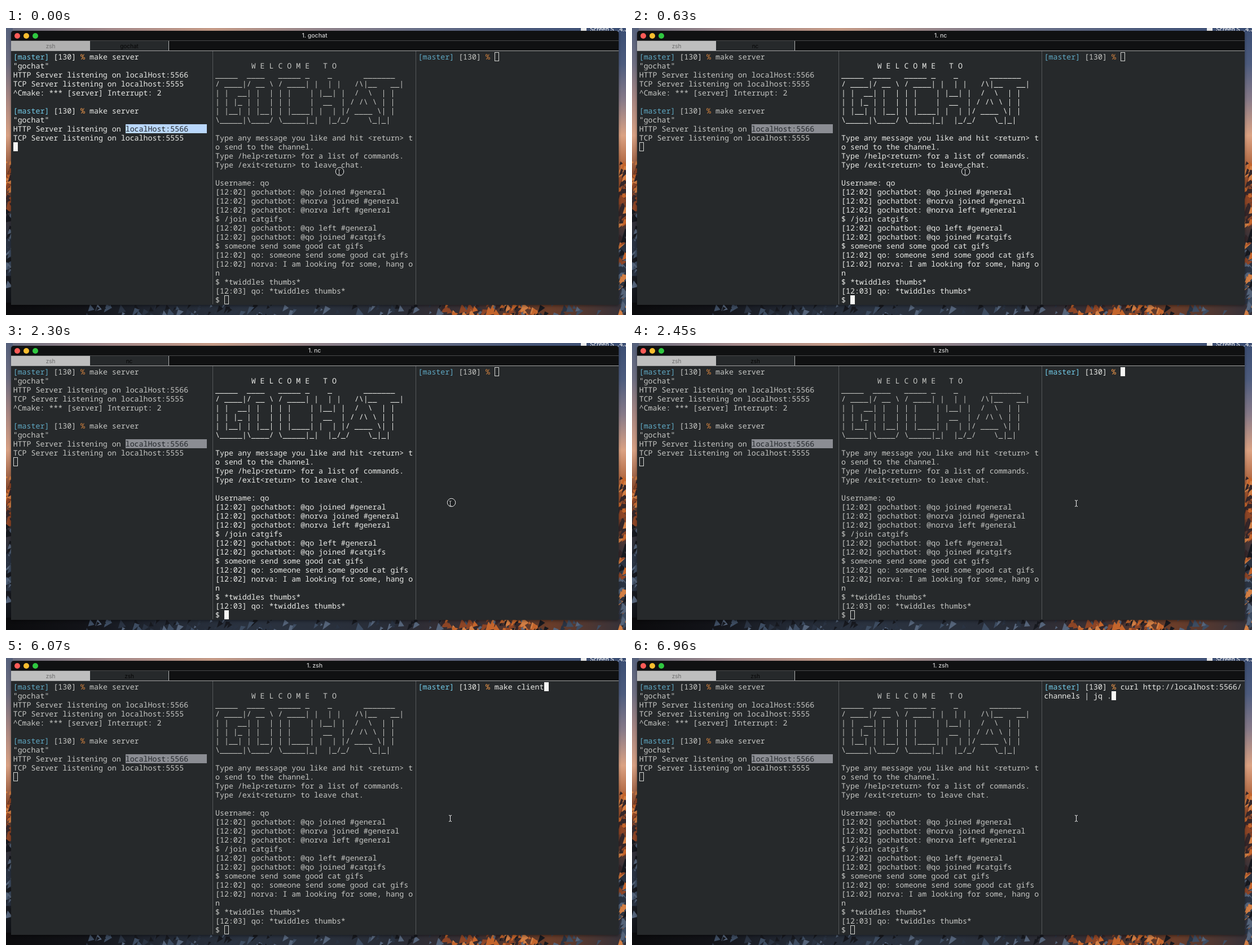
Write an HTML page with a canvas that moves like this. It is 1099x510 px and loops after 8 s.

```html
<!DOCTYPE html>
<html lang="en">
<head>
<meta charset="utf-8">
<title>Terminal chat</title>
<style>
html, body { margin: 0; width: 100%; height: 100%; overflow: hidden; background: #1c1a1c; }
#stage { position: relative; width: 1099px; height: 510px; overflow: hidden; }
#stage * { position: absolute; box-sizing: border-box; }
#stage span { position: static; }
#file { left: 1035px; top: -5px; font: 500 10px/14px Inter, sans-serif; color: #f4f4f4; white-space: nowrap; }
#doc { left: 1019px; top: 0; width: 10px; height: 5px; background: #eee; }
#win { left: 9px; top: 5px; width: 1077px; height: 487px; background: #26292b; border-radius: 5px 5px 0 0; box-shadow: 0 2px 5px rgba(0,0,0,.4); }
#bar { left: 9px; top: 5px; width: 1077px; height: 36px; background: #101112; border-radius: 5px 5px 0 0; border-bottom: 1px solid #a4a4a4; }
#title { left: 447px; top: 5px; width: 200px; text-align: center; font: 500 10.5px/18px Inter, sans-serif; color: #d0d0d0; }
.dot { top: 9px; width: 10px; height: 10px; border-radius: 50%; }
.tab { top: 23px; height: 17px; text-align: center; font: 10px/18px Inter, sans-serif; }
#tab1 { left: 9px; width: 140px; background: #b6b6b6; color: #6c6c6c; }
#tab2 { left: 149px; width: 140px; background: #26292b; color: #060606; border-right: 1px solid #b4b4b4; }
#edge { left: 9px; top: 22px; width: 1077px; height: 1px; background: #4a4b4c; }
.rule { top: 41px; width: 1px; height: 450px; background: #55585a; }
pre { margin: 0; top: 43px; font: 13.28px/16px "Noto Sans Mono", "DejaVu Sans Mono", monospace; color: #c6c7c4; text-rendering: geometricPrecision; font-variant-ligatures: none; }
.on { color: #eaebe8; }
.b { color: #5fa9c4; }
.on .b { color: #72cbe8; }
.o { color: #d2823f; }
.on .o { color: #f39a4b; }
.s { color: #22262a; }
#sel { left: 212px; top: 171px; width: 144px; height: 16px; }
.cur { width: 8px; height: 16px; border: 1px solid #d8d9d6; }
.cur.full { background: #f6f6f4; border-color: #f6f6f4; }
</style>
</head>
<body>
<div id="stage">
  <canvas id="wall" width="1099" height="510"></canvas>
  <div id="doc"></div><div id="file">Screen S...4.3</div>
  <div id="win"></div>
  <div id="bar"></div><div id="edge"></div>
  <div class="dot" style="left:15px;background:#fc5b57"></div>
  <div class="dot" style="left:31px;background:#f9bd2e"></div>
  <div class="dot" style="left:47px;background:#2fc840"></div>
  <div id="title"></div>
  <div class="tab" id="tab1">zsh</div><div class="tab" id="tab2"></div>
  <div class="rule" style="left:366px"></div><div class="rule" style="left:726px"></div>
  <div id="sel"></div>
  <pre id="p0" style="left:12.7px"></pre>
  <pre id="p1" style="left:371px"></pre>
  <pre id="p2" style="left:730.5px"></pre>
  <div class="cur" id="c0"></div><div class="cur" id="c1"></div><div class="cur" id="c2"></div>
  <svg id="mouse" width="1099" height="510" fill="none" stroke="#f2f2f2">
    <circle id="ring" r="7.2" fill="#1d2022"/>
    <path id="beam" d="M-2.5-5.5Q0-5.5 0-4V4Q0 5.5-2.5 5.5M2.5-5.5Q0-5.5 0-4M0 4Q0 5.5 2.5 5.5"/>
  </svg>
</div>
<script>
const $ = id => document.getElementById(id);
const LOOP = 8000, CELL = 7.97, ROW = 16, LEFT = [12.7, 371, 730.5];
const prompt = '<span class="b">[master]</span> [130] <span class="o">%</span> ';

const server = prompt + `make server
"gochat"
HTTP Server listening on `;

$('p0').innerHTML = server + `localHost:5566
TCP Server listening on localhost:5555
^Cmake: *** [server] Interrupt: 2

` + server + `<span class="s">localHost:5566</span>
TCP Server listening on localhost:5555`;

$('p1').textContent = String.raw`
        W E L C O M E   T O
_____  ____   _____ _    _       _______
/ ____|/ __ \ / ____| |  | |   /\|__   __|
| |  __| |  | | |    | |__| |  /  \  | |
| | |_ | |  | | |    |  __  | / /\ \ | |
| |__| | |__| | |____| |  | |/ ____ \| |
\_____|\____/ \_____|_|  |_/_/    \_|_|

Type any message you like and hit <return> t
o send to the channel.
Type /help<return> for a list of commands.
Type /exit<return> to leave chat.

Username: qo
[12:02] gochatbot: @qo joined #general
[12:02] gochatbot: @norva joined #general
[12:02] gochatbot: @norva left #general
$ /join catgifs
[12:02] gochatbot: @qo left #general
[12:02] gochatbot: @qo joined #catgifs
$ someone send some good cat gifs
[12:02] qo: someone send some good cat gifs
[12:02] norva: I am looking for some, hang o
n
$ *twiddles thumbs*
[12:03] qo: *twiddles thumbs*
$ `;

// Each table: [start time, value]
const focus = [[0, [0, 'gochat']], [630, [1, 'nc']], [2450, [2, 'zsh']]];
const beamAt = [[0, [590.5, 256]], [1850, [765.5, 275.5]], [2000, [787.5, 285]]];
const ringAt = [[0, [591.5, 255]], [150, null], [630, [591.5, 255]], [780, null],
  [2300, [789.5, 283.5]], [2450, null]];
const url = 'http://localhost:5566/channels';
const command = [[0, ''], [5470, 'make client'], [5770, 'make server'], [6070, 'make client'],
  [6210, `curl -X POST -d '{"message":"hello"}' ${url}/catgifs/messages`],
  [6360, `curl ${url}/catgifs/messages | jq .`], [6960, `curl ${url} | jq .`]];

const at = (steps, t) => steps.filter(s => s[0] <= t).pop()[1];

function place(i, col, row) {
  $('c' + i).style.left = Math.round(LEFT[i] + col * CELL) + 'px';
  $('c' + i).style.top = 43 + row * ROW + 'px';
}

let shownText = null, shownPane = null;
function draw(now) {
  const t = now % LOOP;
  const [pane, name] = at(focus, t);
  if (pane !== shownPane) {
    shownPane = pane;
    $('title').textContent = '1. ' + name;
    $('tab2').textContent = name;
    $('tab1').style.background = pane ? '#bebebe' : '#b0b0b0';
    $('sel').style.background = pane ? '#8b8d93' : '#b9d7fc';
    for (let i = 0; i < 3; i++) {
      $('p' + i).classList.toggle('on', i === pane);
      $('c' + i).classList.toggle('full', i === pane);
    }
  }
  const text = at(command, t);
  if (text !== shownText) {
    shownText = text;
    const rows = (' '.repeat(17) + text).match(/.{1,44}/g);
    $('p2').innerHTML = prompt + rows.join('\n').slice(17);
    place(2, rows[rows.length - 1].length, rows.length - 1);
  }
  const ring = at(ringAt, t), beam = at(beamAt, t);
  $('ring').style.display = ring ? '' : 'none';
  if (ring) $('ring').setAttribute('transform', `translate(${ring})`);
  // The pointer shrinks inside the click ring
  $('beam').setAttribute('transform', `translate(${beam}) scale(${ring ? 0.8 : 1})`);
  requestAnimationFrame(() => draw(performance.now()));
}

// Dusk sky above, sunlit rust peaks, slate rocks below
function paintWall() {
  const g = $('wall').getContext('2d');
  let seed = 11;
  const rnd = () => (seed = seed * 16807 % 2147483647) / 2147483647;
  const fade = (x, y, w, h, colors) => {
    const f = w > h ? g.createLinearGradient(x, 0, x + w, 0) : g.createLinearGradient(0, y, 0, y + h);
    colors.forEach((c, i) => f.addColorStop(i / (colors.length - 1), c));
    g.fillStyle = f;
    g.fillRect(x, y, w, h);
  };
  const rocks = (n, x, y, w, h, size, colors) => {
    for (let i = 0; i < n; i++) {
      const px = x + rnd() * w, py = y + rnd() * h, s = size * (0.4 + rnd());
      g.fillStyle = colors[Math.floor(rnd() * colors.length)];
      g.beginPath();
      g.moveTo(px, py);
      g.lineTo(px + s * 0.6, py + s * rnd());
      g.lineTo(px - s * 0.3, py + s);
      g.fill();
    }
  };
  const slate = ['#17191f', '#3d4c61', '#2a3342', '#55647a'];
  const rust = ['#c4652c', '#8d4526', '#d27f45', '#35272a'];
  fade(0, 0, 1099, 12, ['#6b6f82', '#a58a8c', '#c79c88', '#94858c', '#697089', '#4b5a7c', '#3a4d73']);
  fade(0, 0, 12, 510, ['#56617c', '#6f6f82', '#a98782', '#d8a184', '#8d4f32', '#3c3438', '#28303d', '#1a1e26', '#0c0d10']);
  fade(1083, 0, 16, 510, ['#3a4d73', '#4d5c7e', '#877a88', '#dba283', '#a75a32', '#6d3c2a', '#30323d', '#2b3442', '#3a3038']);
  fade(0, 488, 1099, 22, ['#0b0b0d', '#121318', '#222833', '#2a323f', '#2a313d', '#282c36', '#3b3034', '#6b3d29', '#33313a']);
  rocks(28, 0, 235, 9, 80, 13, rust);
  rocks(40, 0, 320, 9, 130, 13, slate);
  rocks(38, 1086, 235, 13, 115, 15, rust);
  rocks(45, 1086, 350, 13, 150, 15, slate.concat(rust));
  rocks(130, 120, 488, 979, 20, 12, slate);
  rocks(60, 770, 488, 170, 20, 13, rust);
}

place(0, 0, 10);
place(1, 2, 27);
paintWall();
draw(performance.now());
</script>
</body>
</html>
```
